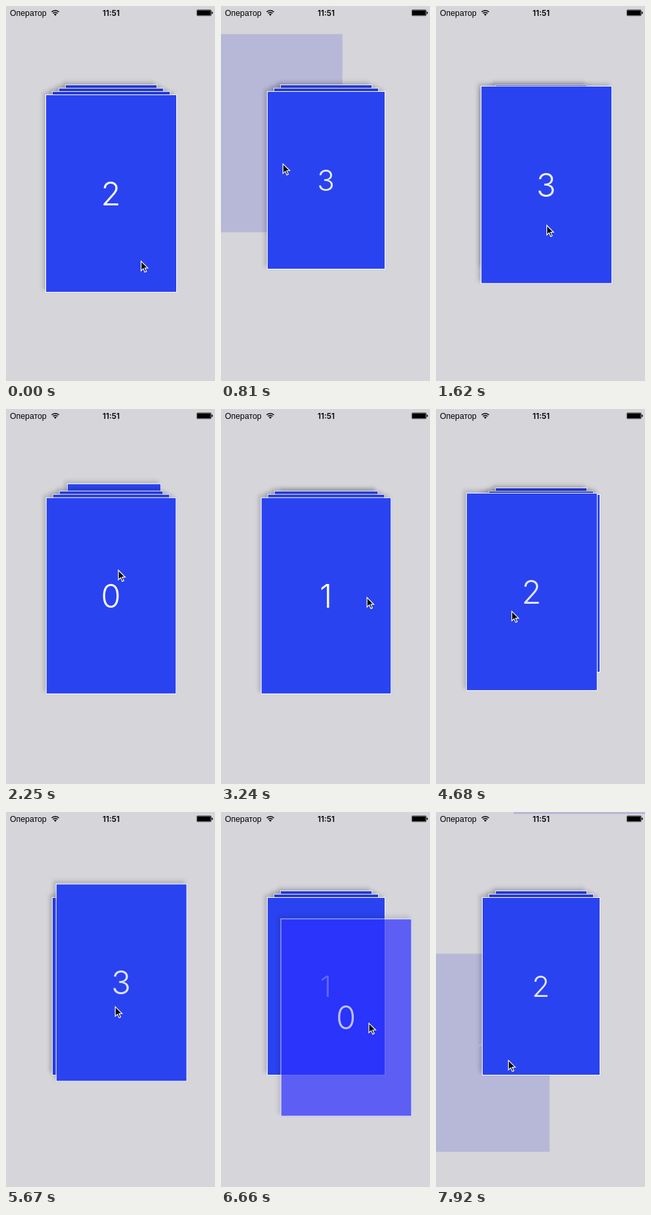
Animation of 318x568 px, one loop 8 s. Source, as an HTML page with a canvas:

```html
<!DOCTYPE html>
<html lang="ru">
<head>
<meta charset="utf-8">
<title>Card stack</title>
<style>
  html, body { margin: 0; width: 100%; height: 100%; overflow: hidden; background: #d5d5da; }
  canvas { display: block; }
</style>
</head>
<body>
<canvas id="stage" width="318" height="568"></canvas>
<script>
const ctx = document.getElementById('stage').getContext('2d');
const W = 318, H = 568, LOOP = 8000, SETTLE = 450;
const BLUE = '#2a43f0', GREY = '#d5d5da';

// Each swipe: grab time, release time, grab point, total move
const swipes = [
  [330, 940, 169, 330, -121, -147],
  [1500, 1871, 160, 345, 76, -124],
  [2450, 2861, 147, 252, 90, 96],
  [3420, 3850, 217, 266, -95, 60],
  [4520, 5000, 129, 313, -126, -63],
  [5500, 5900, 150, 320, 86, -140],
  [6500, 6800, 194, 292, 106, 95],
  [7450, LOOP, 197, 295, -119, 110]
].map(([grab, release, x, y, dx, dy]) => ({ grab, release, x, y, dx, dy }));
const FLUNG = 6; // this card leaves over the top edge
const REST = { x: 205, y: 386 };

const clamp = u => Math.min(1, Math.max(0, u));
const ease = u => (1 - Math.cos(Math.PI * clamp(u))) / 2;
const lerp = (a, b, u) => a + (b - a) * u;
const mix = (a, b, u) => {
  const out = {};
  for (const k in a) out[k] = lerp(a[k], b[k], u);
  return out;
};

// A swipe gathers speed until it is let go
function offset(swipe, t) {
  const u = clamp((t - swipe.grab) / (swipe.release - swipe.grab)) ** 2;
  return { x: swipe.dx * u, y: swipe.dy * u };
}

// The pointer follows a swipe, then glides to the next grab point
function pointer(n, t) {
  const next = swipes[n], prev = swipes[n - 1];
  if (t >= next.grab) {
    const d = offset(next, t);
    return { x: next.x + d.x, y: next.y + d.y };
  }
  const from = prev ? { x: prev.x + prev.dx, y: prev.y + prev.dy } : REST;
  const since = prev ? prev.release : 0;
  return mix(from, next, ease((t - since) / (next.grab - since)));
}

const slot = n => ({ x: 160, y: 284 - 20 * n, scale: 1 - n / 10, alpha: 1, ink: 1 - 0.12 * n });

function dragged(swipe, t) {
  const d = offset(swipe, t);
  const alpha = Math.max(0.2, 1 - Math.abs(d.x) / 100);
  return { x: 160 + d.x, y: 284 + d.y, scale: 1, alpha, ink: alpha };
}

const isFaint = card => card.alpha < 0.4;

// The body fades in three visible steps
function bodyStyle(card) {
  if (isFaint(card)) return [0.19, '#3537c8'];
  return card.alpha < 0.8 ? [0.7, '#2c2eff'] : [1, BLUE];
}

function drawShadow(left, top, w, h) {
  ctx.save();
  ctx.beginPath();
  ctx.rect(-400, -600, 1200, 1800);
  ctx.rect(left, top, w, h);
  ctx.clip('evenodd');
  ctx.shadowColor = 'rgba(0,0,0,.16)';
  ctx.shadowBlur = 6;
  ctx.shadowOffsetX = ctx.shadowOffsetY = -4;
  ctx.fillRect(left, top, w, h);
  ctx.restore();
}

function drawCard(card, number) {
  const { x, y, scale, ink } = card;
  const w = 200 * scale, h = 300 * scale, left = x - w / 2, top = y - h / 2;
  const [alpha, color] = bodyStyle(card);
  ctx.save();
  ctx.globalAlpha = alpha;
  ctx.fillStyle = color;
  if (isFaint(card)) {
    ctx.fillRect(left, top, w, h);
  } else {
    drawShadow(left, top, w, h);
    ctx.fillRect(left + 1, top + 1, w - 2, h - 2);
    ctx.strokeStyle = '#fff';
    ctx.lineWidth = 1;
    ctx.strokeRect(left + 0.5, top + 0.5, w - 1, h - 1);
  }
  ctx.globalAlpha = ink;
  ctx.fillStyle = '#fff';
  ctx.textAlign = 'center';
  ctx.font = `350 ${49 * scale}px Inter, sans-serif`;
  ctx.fillText(number, x - 0.5, y + 18 * scale);
  ctx.restore();
}

function drawCards(n, t) {
  const swipe = swipes[n], prev = swipes[n - 1];
  const label = k => (n + k + 2) % 4;
  const u = prev ? ease((t - prev.release) / SETTLE) : 1;
  const rising = k => mix(slot(k + 1), slot(k), u);

  const front = t >= swipe.grab ? dragged(swipe, t) : rising(0);
  const behind = isFaint(front);
  let last = slot(3);
  if (prev) {
    const thrown = dragged(prev, prev.release);
    if (n - 1 === FLUNG) drawCard(mix(thrown, { ...thrown, x: 218, y: -147 }, u), label(3));
    else last = mix(thrown, last, u);
  }

  if (behind) drawCard(front, label(0));
  drawCard(last, label(3));
  drawCard(rising(2), label(2));
  drawCard(rising(1), label(1));
  if (!behind) drawCard(front, label(0));
}

function drawStatus() {
  ctx.fillStyle = ctx.strokeStyle = '#000';
  ctx.textAlign = 'left';
  ctx.font = '12.3px "Liberation Sans", Arial, sans-serif';
  ctx.fillText('Оператор', 6, 14.5);
  ctx.textAlign = 'center';
  ctx.font = '600 11.8px Inter, sans-serif';
  ctx.fillText('11:51', 160, 14.5);

  // Wi-Fi fan
  const lo = -Math.PI * 0.75, hi = -Math.PI * 0.25;
  ctx.lineWidth = 1.6;
  for (const r of [4.8, 7.8]) {
    ctx.beginPath();
    ctx.arc(75, 14.5, r, lo, hi);
    ctx.stroke();
  }
  ctx.beginPath();
  ctx.moveTo(75, 14.8);
  ctx.arc(75, 14.8, 2.8, lo, hi);
  ctx.fill();

  // Battery
  ctx.lineWidth = 0.6;
  ctx.beginPath();
  ctx.roundRect(290.3, 5.8, 22, 9, 1.5);
  ctx.stroke();
  ctx.fillRect(291, 6.5, 20.6, 7.6);
  ctx.fillRect(313, 8.8, 1.5, 3);
}

function drawPointer({ x, y }) {
  const shape = [[0, 0], [0, 14.5], [3.4, 11.3], [5.9, 16.8], [8.2, 15.8], [5.8, 10.4], [10.4, 10.4]];
  ctx.save();
  ctx.translate(x + 0.5, y + 0.5);
  ctx.beginPath();
  for (const p of shape) ctx.lineTo(...p);
  ctx.closePath();
  ctx.fillStyle = '#000';
  ctx.strokeStyle = '#fff';
  ctx.lineWidth = 1.2;
  ctx.shadowColor = 'rgba(0,0,0,.35)';
  ctx.shadowBlur = 2;
  ctx.shadowOffsetY = 1;
  ctx.fill();
  ctx.shadowColor = 'transparent';
  ctx.stroke();
  ctx.restore();
}

function draw(t) {
  const n = swipes.findIndex(s => t < s.release);
  ctx.fillStyle = GREY;
  ctx.fillRect(0, 0, W, H);
  drawCards(n, t);
  drawStatus();
  drawPointer(pointer(n, t));
}

const begin = performance.now();
function tick() {
  draw((performance.now() - begin) % LOOP);
  requestAnimationFrame(tick);
}
tick();
</script>
</body>
</html>
```
